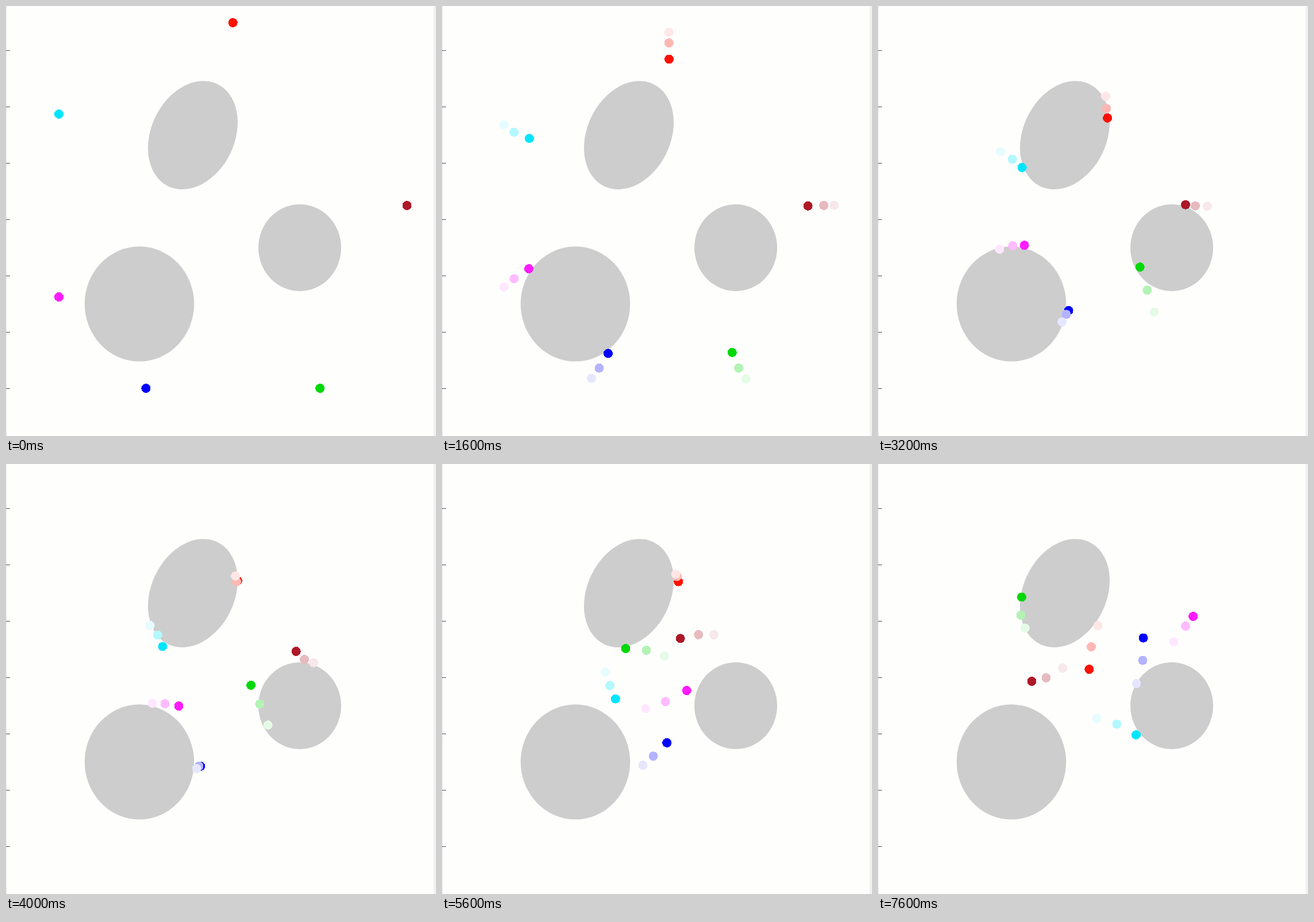
These frames come from a looping animation (748 by 748 pixels, 8 s). An HTML page:

```html
<!DOCTYPE html>
<html lang="en">
<head>
<meta charset="utf-8">
<title>Moving agents and obstacles</title>
<style>
  html, body { margin: 0; width: 100%; height: 100%; overflow: hidden; background: #fefefd; }
  svg { display: block; width: 100vw; height: 100vh; }
</style>
</head>
<body>
<svg viewBox="0 0 748 748">
  <rect width="748" height="748" fill="#fefefd"/>
  <rect x="744" width="4" height="748" fill="#f0f0f0"/>
  <rect width="0.5" height="748" fill="#ccc"/>
  <g id="ticks" fill="#505050"></g>
  <g fill="#cdcdcd">
    <ellipse rx="72.5" ry="98.6" transform="translate(325 224.7) rotate(25.5)"/>
    <ellipse cx="511" cy="420.5" rx="72" ry="75.5"/>
    <ellipse cx="232" cy="518.3" rx="95.2" ry="100"/>
  </g>
  <g id="dots" shape-rendering="crispEdges"></g>
</svg>
<script>
const STEP = 400, STEPS = 20;
const LEG = 3; // steps between waypoints
const FADES = [1, 0.3, 0.1]; // newest position first; older ones lie on top
const CENTER = { x: 394.8, y: 347 }, UNIT = { x: 75.7, y: 79.5 };

// home is in units from the centre; via holds the turns taken around the obstacles
const AGENTS = [
  { rgb: [255, 16, 0], home: { x: 0, y: -4 },
    via: "396,157 401,204.5 406.5,191.5 409,221 371,318 368,441" },
  { rgb: [0, 229, 255], home: { x: -4, y: -2 },
    via: "213,253.5 264,297.5 284,362 318.5,427.5 415.5,452.5 517,517" },
  { rgb: [174, 24, 40], home: { x: 4, y: 0 },
    via: "573,348.5 519,340 473,297 383,314.5 292.5,372 222,379" },
  { rgb: [0, 216, 8], home: { x: 2, y: 4 },
    via: "480.5,532.5 441.5,417.5 387,334 289.5,314.5 248.5,263 266,156" },
  { rgb: [0, 0, 255], home: { x: -2, y: 4 },
    via: "320,549.5 335.5,525.5 349.5,524 413,456.5 460.5,341.5 451,224" },
  { rgb: [255, 28, 255], home: { x: -4, y: 2 },
    via: "211.5,423 276.5,417 354.5,425.5 459.5,371 535,282 564,242" }
];

function add(parent, name, attrs) {
  const el = document.createElementNS("http://www.w3.org/2000/svg", name);
  for (const key in attrs) el.setAttribute(key, attrs[key]);
  return parent.appendChild(el);
}

const tint = (rgb, a) => `rgb(${rgb.map(c => Math.round(255 + (c - 255) * a)).join()})`;

// every agent starts from rest, pulled to the centre by a saturating force
function opening(home, axis) {
  const at = u => CENTER[axis] + UNIT[axis] * u;
  return [at(home), at(home - 0.445 * Math.tanh(0.72 * home))];
}

// Catmull-Rom curve through evenly timed values, at rest in the first
function curve(v) {
  const last = v.length - 1;
  const pull = i => i === 0 ? 0 : i === last ? v[i] - v[i - 1] : (v[i + 1] - v[i - 1]) / 2;
  return step => {
    const i = Math.floor(step / LEG), u = step / LEG - i, w = 1 - u;
    return w * w * (1 + 2 * u) * v[i] + u * u * (3 - 2 * u) * v[i + 1]
      + u * w * (w * pull(i) - u * pull(i + 1));
  };
}

const ticks = document.getElementById("ticks");
for (let i = 0; i < 7; i++) {
  add(ticks, "rect", { y: Math.round(77.2 + 97.9 * i), width: 7, height: 1 });
}

const layer = document.getElementById("dots");
for (const agent of AGENTS) {
  const points = agent.via.split(" ").map(p => p.split(",").map(Number));
  agent.x = curve([...opening(agent.home.x, "x"), ...points.map(p => p[0])]);
  agent.y = curve([...opening(agent.home.y, "y"), ...points.map(p => p[1])]);
  agent.dots = FADES.map(a => add(layer, "circle", { r: 8, fill: tint(agent.rgb, a) }));
}

function draw(time) {
  const step = Math.floor(time / STEP) % STEPS;
  for (const agent of AGENTS) {
    agent.dots.forEach((dot, lag) => {
      const at = step - lag;
      dot.setAttribute("visibility", at < 0 ? "hidden" : "visible");
      if (at < 0) return;
      dot.setAttribute("cx", agent.x(at).toFixed(2));
      dot.setAttribute("cy", agent.y(at).toFixed(2));
    });
  }
}

const start = performance.now();
function tick() {
  draw(performance.now() - start);
  requestAnimationFrame(tick);
}
tick();
</script>
</body>
</html>
```
